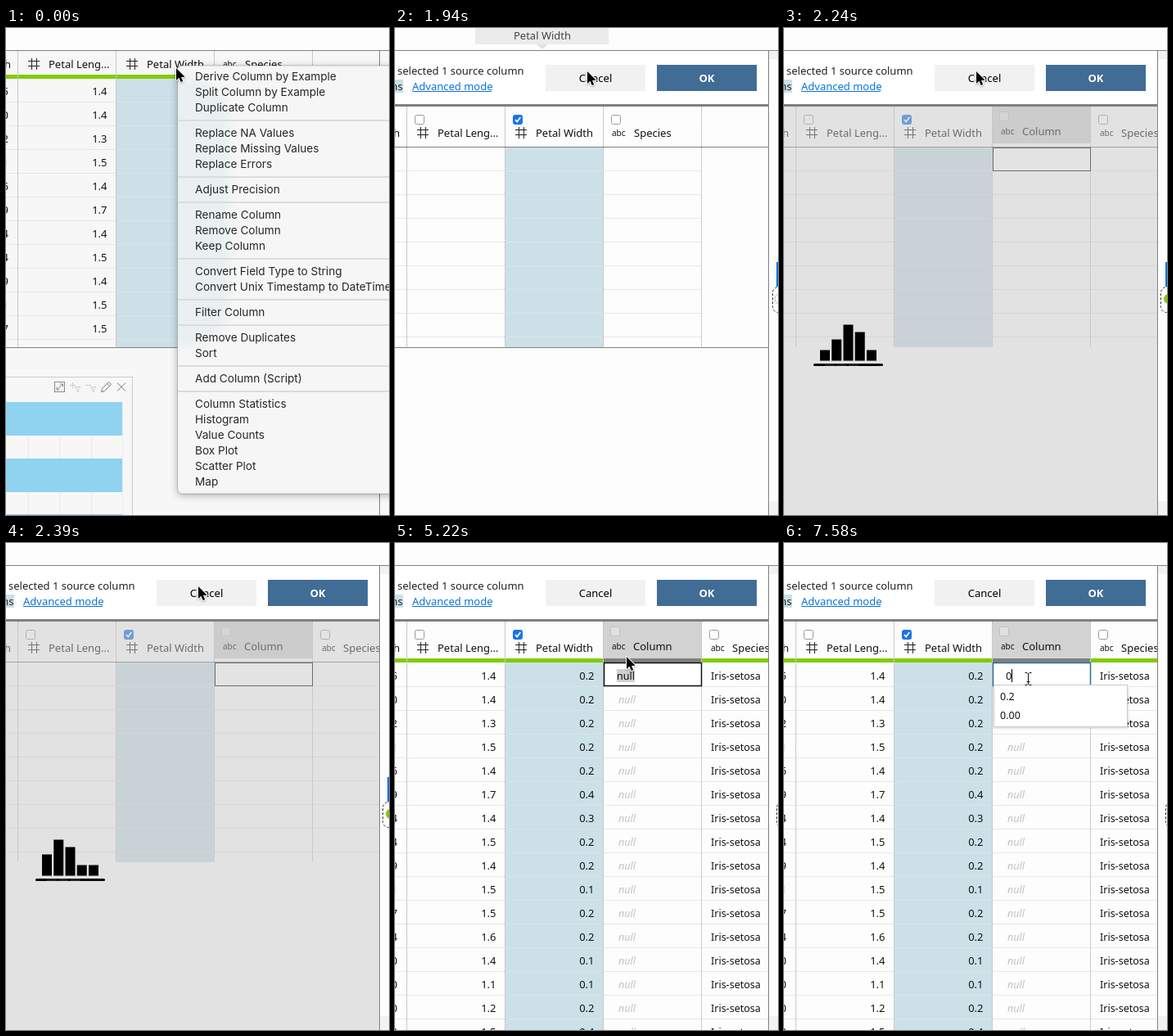
Write an HTML page with a canvas that moves like this. It is 468x595 px and loops after 8 s.

```html
<!DOCTYPE html>
<html lang="en">
<head>
<meta charset="utf-8">
<title>Column by example</title>
<style>
html, body { margin: 0; width: 100%; height: 100%; overflow: hidden; background: #fff; }
canvas { display: block; width: 468px; height: 595px; }
</style>
</head>
<body>
<canvas id="stage"></canvas>
<script>
const W = 468, H = 595, LOOP = 8000, ROW = 29, EDGE = 456;
const dpr = window.devicePixelRatio || 1;

function setup(canvas) {
  canvas.width = W * dpr;
  canvas.height = H * dpr;
  const ctx = canvas.getContext('2d');
  ctx.scale(dpr, dpr);
  return ctx;
}

const stage = setup(document.getElementById('stage'));
const layer = setup(document.createElement('canvas'));
let c = stage;

const SANS = '"Noto Sans", "Open Sans", sans-serif';
const UI = 'Inter, Roboto, sans-serif';
const BLUE = '#cce0e8', GREEN = '#80cc00', LINE = '#808080';

const sepal = '5021694491740000'.split('');
const petal = [14, 14, 13, 15, 14, 17, 14, 15, 14, 15, 15, 16, 14, 11, 12, 15];
const width = [2, 2, 2, 2, 2, 4, 3, 2, 2, 1, 2, 2, 1, 1, 2, 4];

const menuItems = [
  'Derive Column by Example', 'Split Column by Example', 'Duplicate Column', '',
  'Replace NA Values', 'Replace Missing Values', 'Replace Errors', '',
  'Adjust Precision', '',
  'Rename Column', 'Remove Column', 'Keep Column', '',
  'Convert Field Type to String', 'Convert Unix Timestamp to DateTime', '',
  'Filter Column', '',
  'Remove Duplicates', 'Sort', '',
  'Add Column (Script)', '',
  'Column Statistics', 'Histogram', 'Value Counts', 'Box Plot', 'Scatter Plot', 'Map'
];

// time, x, y of the pointer tip; a fourth value marks the text cursor
const pointer = [
  [0, 208, 49], [300, 218, 51], [450, 230, 53], [600, 235, 53],
  [2830, 236, 60], [2980, 253, 88], [3130, 274, 122], [3270, 283, 136],
  [5220, 283, 139], [5370, 286, 152], [5520, 288, 168], [5660, 289, 175], [5810, 287, 166],
  [6680, 295, 170, 1], [6830, 298, 166, 1]
];

function rect(x, y, w, h, color) {
  c.fillStyle = color;
  c.fillRect(x, y, w, h);
}

function box(x, y, w, h, color, lw = 1) {
  c.strokeStyle = color;
  c.lineWidth = lw;
  c.strokeRect(x, y, w, h);
}

function round(x, y, w, h, r) {
  c.beginPath();
  c.roundRect(x, y, w, h, r);
}

function path(points, color, lw = 1) {
  c.beginPath();
  points.forEach(([x, y], i) => i ? c.lineTo(x, y) : c.moveTo(x, y));
  c.strokeStyle = color;
  c.lineWidth = lw;
  c.stroke();
}

function text(s, x, y, { size = 13, color = '#111', align = 'left', style = '', font = SANS } = {}) {
  c.font = `${style} ${size}px ${font}`;
  c.textAlign = align;
  c.fillStyle = color;
  c.fillText(s, x, y);
}

function dotted(x, y0, y1) {
  c.setLineDash([1, 1]);
  path([[x + 0.5, y0], [x + 0.5, y1]], '#999');
  c.setLineDash([]);
}

function hash(x, y) {
  for (const d of [-2.5, 3.5]) {
    path([[x + d, y - 7], [x + d, y + 7]], '#222');
    path([[x - 7, y + d - 1], [x + 7, y + d - 1]], '#222');
  }
}

function abc(x, y) {
  text('abc', x, y, { size: 10, style: '500' });
}

function check(x, y, on, alpha = 1) {
  c.globalAlpha *= alpha;
  round(x + 0.5, y + 0.5, 11, 11, 2);
  c.fillStyle = on ? '#1a73e8' : '#fff';
  c.fill();
  c.strokeStyle = on ? '#1a73e8' : '#999';
  c.lineWidth = 1;
  c.stroke();
  if (on) path([[x + 3, y + 6], [x + 5.2, y + 8.6], [x + 9.3, y + 3]], '#fff', 1.7);
  c.globalAlpha /= alpha;
}

function clip(x, y, w, h, draw) {
  c.save();
  c.beginPath();
  c.rect(x, y, w, h);
  c.clip();
  draw();
  c.restore();
}

function headers(y) {
  text('h', 6, y + 5, { align: 'right' });
  hash(34, y);
  text('Petal Leng...', 52, y + 5);
  hash(154, y);
  text('Petal Width', 172, y + 5);
}

function numbers(top, count) {
  for (let i = 0; i < count; i++) {
    const y = top + 20 + i * ROW;
    text(sepal[i], 3, y, { align: 'right' });
    text((petal[i] / 10).toFixed(1), 123.5, y, { align: 'right' });
    text((width[i] / 10).toFixed(1), 243.5, y, { align: 'right' });
  }
}

function rules(top, bottom, right) {
  for (let y = top + 28; y < bottom; y += ROW) rect(0, y, right, 1, 'rgba(225,228,230,.85)');
}

function greenBar(y, cols) {
  for (const [x, w] of cols) rect(x, y, w, 5, GREEN);
}

function frame() {
  rect(0, 27, W, 1, LINE);
  rect(EDGE, 28, 1, H - 28, LINE);
}

function chart() {
  box(-1, 426.5, 155.5, 200, '#ccc');
  for (const x of [27, 65, 104, 142]) rect(x, 457, 1, H - 457, '#eaeaea');
  for (const y of [457, 526, 594]) rect(0, y, 142, 41, '#90d3ef');
  box(59.5, 432.5, 12, 12, '#888');
  path([[62, 442], [69.5, 434.8]], '#888');
  path([[66, 435], [69.5, 435], [69.5, 438.5]], '#888');
  path([[62, 438.5], [62, 442], [65.5, 442]], '#888');
  for (const x of [78, 97]) {
    path([[x, 436.5], [x + 7, 436.5]], '#ccc');
    path([[x + 6, 438.5], [x + 13, 438.5], [x + 10.5, 441], [x + 10.5, 445], [x + 8.5, 443.5], [x + 8.5, 441], [x + 6, 438.5]], '#ccc');
  }
  path([[81.5, 433], [81.5, 440]], '#ccc');
  path([[116.5, 444.5], [117.5, 440.5], [125.5, 432.5], [128.5, 435.5], [120.5, 443.5], [116.5, 444.5]], '#777');
  path([[123.5, 434.5], [126.5, 437.5]], '#777');
  path([[136, 433.5], [146, 443.5]], '#777');
  path([[146, 433.5], [136, 443.5]], '#777');
}

function listView() {
  rect(0, 0, W, 27, '#fdfdfd');
  rect(0, 27, W, H, '#f7f7f7');
  rect(135, 62, 119, 328, BLUE);
  rules(62, 390, 374);
  greenBar(57, [[0, 14], [15, 119], [135, 119], [255, 119]]);
  for (const x of [14, 134, 254, 374]) dotted(x, 28, 390);
  headers(44);
  abc(265, 48);
  text('Species', 292, 49);
  numbers(62, 11);
  for (let i = 0; i < 11; i++) text('Iris-setosa', 266, 82 + i * ROW, { size: 12.5 });
  rect(0, 390, EDGE, 1, LINE);
  frame();
  rect(466, 286, 2, 30, '#1473e6');
  chart();
}

function menu(active) {
  const outline = () => round(209.5, 46, 290, 523, 6);
  c.save();
  c.shadowColor = 'rgba(0,0,0,.3)';
  c.shadowBlur = 10 * dpr;
  c.shadowOffsetY = 2 * dpr;
  outline();
  c.fillStyle = '#f6f6f6';
  c.fill();
  c.restore();

  // tint of the blue column showing through the panel
  c.save();
  outline();
  c.clip();
  c.filter = `blur(${5 * dpr}px)`;
  round(150, 62, 122, 326, 50);
  c.fillStyle = 'rgba(204,224,228,.3)';
  c.fill();
  c.restore();

  outline();
  c.strokeStyle = 'rgba(0,0,0,.2)';
  c.lineWidth = 1;
  c.stroke();
  let y = 59;
  menuItems.forEach((s, i) => {
    if (!s) {
      rect(210, y - 4, W - 210, 2, '#dcdcdc');
      y += 12;
      return;
    }
    const lit = active && i === 0;
    if (lit) rect(210, 50, W - 210, 19, '#3e9bfc');
    text(s, 231, y + 5, { size: 13.6, font: UI, color: lit ? '#fff' : '#262626' });
    y += 19;
  });
}

// The menu is composed on its own layer so that it fades as a whole.
function fadeMenu(alpha, active) {
  c = layer;
  c.clearRect(0, 0, W, H);
  menu(active);
  c = stage;
  c.globalAlpha = alpha;
  c.drawImage(layer.canvas, 0, 0, W, H);
  c.globalAlpha = 1;
}

function dialogTop() {
  rect(0, 28, EDGE, 66, '#fff');
  text('selected 1 source column', 3, 57, { color: '#222' });
  rect(0, 63, 10, 16, BLUE);
  text('ns', 9.5, 76, { align: 'right', color: '#222' });
  text('Advanced mode', 21, 76, { color: '#0a73e0' });
  rect(21, 77, 97, 1, '#0a73e0');
  rect(184, 45, 122, 32, '#f1f1f1');
  text('Cancel', 245, 66, { align: 'center', color: '#000' });
  rect(320, 45, 122, 32, '#416c95');
  text('OK', 381, 66, { align: 'center', color: '#fff', style: '600' });
  rect(0, 93, EDGE, 3, LINE);
}

function sideTab(x, dot) {
  c.setLineDash([3, 2]);
  round(x + 0.5, 316.5, 30, 31, 7);
  c.strokeStyle = '#333';
  c.lineWidth = 1;
  c.stroke();
  c.setLineDash([]);
  if (!dot) return;
  c.beginPath();
  c.arc(470, 331, 6, 0, Math.PI * 2);
  if (dot === GREEN) {
    c.fillStyle = dot;
    c.fill();
  } else {
    c.strokeStyle = dot;
    c.stroke();
  }
}

function sourceHeads() {
  check(24, 106, false);
  check(144, 106, true);
  headers(128);
}

function pickView() {
  rect(135, 146, 119, 244, BLUE);
  rules(146, 390, 374);
  for (const x of [14, 134, 254, 374]) dotted(x, 96, 390);
  sourceHeads();
  check(264, 106, false);
  abc(265, 132);
  text('Species', 292, 133);
  rect(0, 145, EDGE, 1, LINE);
  rect(0, 390, EDGE, 1, LINE);
  rect(98, 0, 163, 20, '#ebebeb');
  text('Petal Width', 180, 14, { align: 'center', color: '#444' });
  c.beginPath();
  c.moveTo(173, 20);
  c.lineTo(187, 20);
  c.lineTo(180, 26);
  c.fillStyle = '#e2e2e2';
  c.fill();
  rect(466, 286, 2, 30, '#1473e6');
  sideTab(461, '#bbb');
}

function newColumnHead() {
  rect(255, 96, 119, 45, '#d2d2d2');
  check(263, 102, false, 0.35);
  abc(265, 130);
  text('Column', 291, 131);
  check(384, 106, false);
  abc(386, 132);
  text('Species', 412, 133);
}

function loader(step) {
  const hs = [13, 26, 44, 35, 13];
  hs.forEach((_, i) => {
    const h = hs[(i + step + 4) % 5];
    rect(44 + i * 14.25, 406.5 - h, 12, h, '#000');
  });
  round(36, 410, 85, 3, 1.5);
  c.fill();
  for (const x of [50, 64, 79]) rect(x, 410, 12, 3, '#222');
}

function busyView(step) {
  clip(0, 96, EDGE, H, () => {
    rect(135, 146, 119, 244, BLUE);
    rules(146, 390, EDGE);
    for (const x of [14, 134, 254, 374]) dotted(x, 96, 390);
    sourceHeads();
    newColumnHead();
    rect(0, 145, EDGE, 1, LINE);
    rect(255, 146, 119, 28, '#fff');
    box(255.5, 146.5, 119, 28, '#111');
    rect(0, 96, EDGE, H, `rgba(200,200,200,${step ? 0.5 : 0.25})`);
    loader(step);
  });
  rect(466, 286, 2, 30, '#1473e6');
  sideTab(460, GREEN);
}

function editView(t) {
  const focus = t >= 6380, typed = t >= 7430;
  clip(0, 96, EDGE, H, () => {
    rect(135, 146, 119, H, BLUE);
    rules(147, H, EDGE);
    for (const x of [14, 134, 254, 374]) dotted(x, 96, H);
    sourceHeads();
    newColumnHead();
    greenBar(141, [[0, 14], [15, 119], [135, 119], [375, 81]]);
    rect(255, 141, 119, 5, LINE);
    numbers(147, 16);
    for (let i = 0; i < 16; i++) {
      const y = 167 + i * ROW;
      text('Iris-setosa', 386, y, { size: 12.5 });
      if (i) text('null', 273, y - 0.5, { size: 12.5, style: 'italic 500', color: '#c2c2c2' });
    }
    rect(256, 147, 118, 27, '#fff');
    box(255.5, 146.5, 119, 28, focus ? '#2b6f9e' : '#111', 1.5);
    if (typed) {
      text('0', 271, 167);
      rect(278, 154, 1, 16, '#000');
    } else {
      rect(271, 154, 22, 16, focus ? '#b3d7ff' : '#d0d0d0');
      text('null', 271, 167, { size: 12.5 });
    }
  });
  sideTab(466);
  if (t < 7580) return;
  c.save();
  c.shadowColor = 'rgba(0,0,0,.2)';
  c.shadowBlur = 3 * dpr;
  c.shadowOffsetY = dpr;
  rect(256, 174, 164, 51, '#fff');
  c.restore();
  box(256.5, 173.5, 163, 51, '#ccc');
  text('0.2', 264, 192, { size: 12.5 });
  text('0.00', 264, 215, { size: 12.5 });
}

function dialog(t) {
  rect(0, 0, W, H, '#fdfdfd');
  rect(457, 28, 11, 10, '#f2f2f2');
  rect(457, 578, 11, 17, '#f2f2f2');
  if (t < 2090) pickView();
  else if (t < 2680) busyView(Math.floor((t - 2090) / 150));
  else editView(t);
  dialogTop();
  frame();
}

function drawPointer(t) {
  const [, x, y, beam] = pointer.filter(p => p[0] <= t).pop();
  if (beam) {
    const strokes = [
      [[x - 3.5, y - 7.5], [x - 1, y - 7.5], [x + 0.5, y - 6], [x + 2, y - 7.5], [x + 4.5, y - 7.5]],
      [[x + 0.5, y - 6], [x + 0.5, y + 6]],
      [[x - 3.5, y + 7.5], [x - 1, y + 7.5], [x + 0.5, y + 6], [x + 2, y + 7.5], [x + 4.5, y + 7.5]],
      [[x - 1.5, y + 3.5], [x + 2.5, y + 3.5]]
    ];
    for (const s of strokes) path(s, '#111');
    return;
  }
  const shape = [[0, 0], [0, 15], [3.4, 11.8], [5.7, 17], [8.2, 15.9], [6, 10.9], [10.7, 10.7]];
  c.save();
  c.translate(x, y);
  c.shadowColor = 'rgba(0,0,0,.3)';
  c.shadowBlur = 2 * dpr;
  c.shadowOffsetY = dpr;
  c.beginPath();
  for (const [px, py] of shape) c.lineTo(px, py);
  c.closePath();
  c.lineJoin = 'round';
  c.strokeStyle = '#fff';
  c.lineWidth = 2;
  c.stroke();
  c.shadowColor = 'transparent';
  c.fillStyle = '#000';
  c.fill();
  c.restore();
}

function draw(t) {
  if (t < 1790) {
    listView();
    const alpha = t < 1040 ? 1 : t < 1190 ? 0.6 : t < 1340 ? 0.2 : 0;
    if (alpha) fadeMenu(alpha, t >= 300);
  } else {
    dialog(t);
  }
  drawPointer(t);
}

const start = performance.now();
function tick() {
  draw((performance.now() - start) % LOOP);
  requestAnimationFrame(tick);
}
tick();
</script>
</body>
</html>
```
